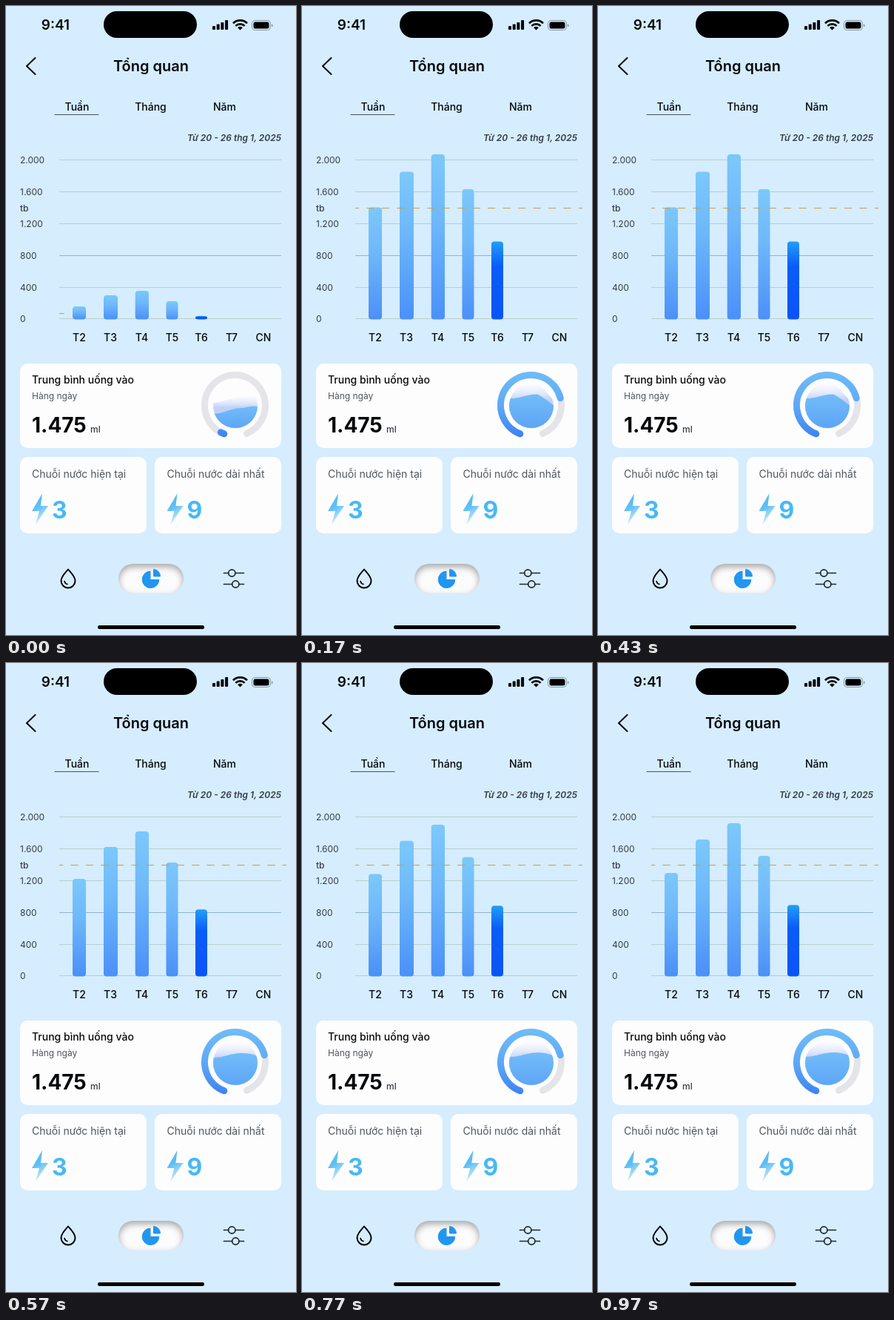
Recreate the animation shown at these times as an HTML page. Size 392 by 848 pixels, loop 1.01 s.

```html
<!DOCTYPE html>
<html lang="vi">
<head>
<meta charset="utf-8">
<title>Tổng quan</title>
<style>
  html, body { margin: 0; width: 100%; height: 100%; overflow: hidden; background: #d5edfe; }
  svg { display: block; width: 392px; height: 848px; }
  text { font-family: Inter, Roboto, sans-serif; font-size: 14px; fill: #06080a; }
  .mid { text-anchor: middle; }
  .med { font-weight: 500; }
  .small { font-size: 12px; fill: #343c44; }
  .soft { fill: #50565c; }
  .card { fill: #fdfdfe; }
  .streak { font-size: 32px; font-weight: 700; fill: #47b9f4; }
  .line { fill: none; stroke: #000; stroke-width: 2; stroke-linecap: round; stroke-linejoin: round; }
  .pill {
    position: absolute; left: 152px; top: 752px; width: 88px; height: 40px;
    border-radius: 20px; background: #fcfcfd;
    box-shadow: inset 0 4px 10px rgba(60, 60, 62, .45);
  }
  .pie { position: absolute; left: 0; top: 0; pointer-events: none; }
</style>
</head>
<body>
<svg viewBox="0 0 392 848">
  <defs>
    <linearGradient id="bar" x2="0" y2="1">
      <stop stop-color="#7cc8fa"/><stop offset=".4" stop-color="#6eb8fa"/><stop offset="1" stop-color="#4a90f8"/>
    </linearGradient>
    <linearGradient id="today" x2="0" y2="1">
      <stop stop-color="#249df6"/><stop offset=".32" stop-color="#0a5cf8"/><stop offset="1" stop-color="#0a54f6"/>
    </linearGradient>
    <linearGradient id="ring" gradientUnits="userSpaceOnUse" x1="0" y1="493" x2="0" y2="584">
      <stop stop-color="#6fbdf8"/><stop offset=".5" stop-color="#5ea8f6"/><stop offset="1" stop-color="#3b80f2"/>
    </linearGradient>
    <linearGradient id="mist" x2="0" y2="1">
      <stop stop-color="#e4e8fb" stop-opacity="0"/><stop offset=".36" stop-color="#c0d2f8"/>
    </linearGradient>
    <linearGradient id="water" x2="0" y2="1">
      <stop stop-color="#72bcf8"/><stop offset="1" stop-color="#5ca4f6"/>
    </linearGradient>
    <linearGradient id="zap" x2=".3" y2="1">
      <stop stop-color="#4fbcf5"/><stop offset=".5" stop-color="#5cbff5"/><stop offset="1" stop-color="#cfe9fb"/>
    </linearGradient>
    <clipPath id="bowl"><circle cx="310" cy="539" r="30"/></clipPath>
    <path id="bolt" d="M49 657L35 681H45L40 699L57 674H47Z" fill="url(#zap)"/>
  </defs>

  <!-- status bar -->
  <text class="mid" x="67" y="32" style="font-size:19px;font-weight:600">9:41</text>
  <rect x="132" y="7" width="126" height="36" rx="18"/>
  <rect x="279" y="27" width="4" height="5" rx="1"/>
  <rect x="284.7" y="24.5" width="4" height="7.5" rx="1"/>
  <rect x="290.4" y="22" width="4" height="10" rx="1"/>
  <rect x="296.1" y="19" width="4" height="13" rx="1"/>
  <g fill="none" stroke="#000" stroke-width="2.7">
    <path d="M307 23.2A13.6 13.6 0 0 1 326 23.2"/>
    <path d="M310.4 26.9A8.7 8.7 0 0 1 322.6 26.9"/>
  </g>
  <path d="M316.5 32.6L313.2 29.2A4.7 4.7 0 0 1 319.8 29.2Z"/>
  <rect x="332.5" y="19.5" width="25" height="13" rx="4" fill="none" stroke="#8b9aa6"/>
  <rect x="334.5" y="21.5" width="21" height="9" rx="2.5"/>
  <path d="M359 24V28.4Q360.6 27.6 360.6 26.2T359 24Z" fill="#8b9aa6"/>

  <!-- header -->
  <path class="line" d="M39.5 70L28 81L39.5 92"/>
  <text class="mid" x="196" y="88" style="font-size:20px;font-weight:600">Tổng quan</text>
  <text class="mid med" x="96" y="141">Tuần</text>
  <text class="mid med" x="195.5" y="141">Tháng</text>
  <text class="mid med" x="295.5" y="141">Năm</text>
  <path d="M65.5 146.5H125.5" stroke="#4a545c"/>
  <text class="small" x="372" y="182" text-anchor="end" style="font-weight:600;font-style:italic">Từ 20 - 26 thg 1, 2025</text>

  <!-- chart -->
  <g id="grid"></g>
  <text class="small med" x="19" y="276.5">tb</text>
  <g id="bars"></g>
  <path id="avg" stroke="#c3a24a"/>
  <g id="days"></g>

  <!-- daily average -->
  <rect class="card" x="19" y="482" width="353" height="114" rx="10"/>
  <text class="med" x="35" y="509">Trung bình uống vào</text>
  <text class="small soft" x="35" y="530">Hàng ngày</text>
  <text x="35" y="575" style="font-size:28px;font-weight:700">1.475</text>
  <text class="small med" x="114" y="575">ml</text>
  <g fill="none" stroke-width="9" stroke-linecap="round">
    <path id="track" stroke="#e4e4e9"/>
    <path id="fill" stroke="url(#ring)" pathLength="316"/>
  </g>
  <g clip-path="url(#bowl)">
    <path id="back" fill="url(#mist)"/>
    <path id="front" fill="url(#water)"/>
  </g>

  <!-- streaks -->
  <rect class="card" x="19" y="608" width="171" height="103" rx="10"/>
  <rect class="card" x="201" y="608" width="171" height="103" rx="10"/>
  <text class="soft" x="35" y="636">Chuỗi nước hiện tại</text>
  <text class="soft" x="217.5" y="636">Chuỗi nước dài nhất</text>
  <use href="#bolt"/>
  <use href="#bolt" x="182.5"/>
  <text class="streak" x="62" y="690.5">3</text>
  <text class="streak" x="244.5" y="690.5">9</text>

  <!-- navigation -->
  <path class="line" d="M84 759.5C80.5 764 74.5 769 74.5 775A9.5 9.5 0 0 0 93.5 775C93.5 769 87.5 764 84 759.5Z"/>
  <path class="line" d="M79 775.5A5 5 0 0 0 83 779.5" style="stroke-width:1.6"/>
  <g class="line" style="stroke:#20262c;stroke-width:1.7">
    <path d="M294.5 764.5H300.5M310 764.5H321.5M294.5 779.5H305.5M315 779.5H321.5"/>
    <circle cx="305.3" cy="764.5" r="4.6"/>
    <circle cx="310.3" cy="779.5" r="4.6"/>
  </g>
  <rect x="124" y="835" width="144" height="5" rx="2.5"/>
</svg>
<div class="pill"></div>
<svg class="pie" viewBox="0 0 392 848">
  <g fill="#2196f0" stroke="#2196f0" stroke-linejoin="round">
    <path d="M195 762A11.3 11.3 0 1 0 206.8 773.5H195Z"/>
    <path d="M199.5 759.5A9.3 9.3 0 0 1 208.5 769H199.5Z"/>
  </g>
</svg>

<script>
const $ = id => document.getElementById(id);
const LOOP = 1010, LAST = 29, BASE = 422.5;

function add(parent, tag, attrs, text = '') {
  const el = document.createElementNS('http://www.w3.org/2000/svg', tag);
  for (const key in attrs) el.setAttribute(key, attrs[key]);
  el.textContent = text;
  return $(parent).appendChild(el);
}

['2.000', '1.600', '1.200', '800', '400', '0'].forEach((label, i) => {
  const y = i < 5 ? 207.5 + i * 43 : 421.5;
  add('grid', 'path', { d: `M72 ${y}H372`, stroke: label === '800' ? '#93b3cc' : '#b9cfc6' });
  add('grid', 'text', { class: 'small', x: 19, y: y + 4.4 }, label);
});

[99, 141, 183.5, 224.5, 264, 305, 348].forEach((x, i) =>
  add('days', 'text', { class: 'mid med', x, y: 452 }, i < 6 ? 'T' + (i + 2) : 'CN'));

// x, width, height at rest, height when settled
const bars = [
  [90, 18, 17.5, 139.5], [132, 19, 32.5, 184.5], [174.7, 18.3, 38.5, 206.5],
  [216.5, 16, 24.5, 162.5], [256, 16, 4.5, 96.3]
].map(([x, width, from, to], i) => ({
  from, to,
  el: add('bars', 'rect', { x, width, rx: 4, fill: i < 4 ? 'url(#bar)' : 'url(#today)' })
}));

// circular arc in degrees, clockwise
function arc(a, b, r = 41) {
  const at = deg => {
    const k = deg * Math.PI / 180;
    return `${309.5 + r * Math.cos(k)} ${538.5 + r * Math.sin(k)}`;
  };
  return `M${at(a)}A${r} ${r} 0 1 1 ${at(b)}`;
}
$('track').setAttribute('d', arc(111, 427));
$('fill').setAttribute('d', arc(111, 427));

// step, progress, slope per step
const knots = [
  [0, 0, .165], [5, 1.095, .075], [10, 1.226, -.022], [13, 1.095, -.054],
  [17, .934, -.01], [23, .988, .004], [29, 1, 0]
];

function spring(n) {
  const i = Math.max(1, knots.findIndex(k => n <= k[0]));
  const [n0, v0, m0] = knots[i - 1], [n1, v1, m1] = knots[i];
  const d = n1 - n0, u = (n - n0) / d, w = 1 - u;
  return v0 * w * w * (1 + 2 * u) + v1 * u * u * (3 - 2 * u)
    + d * u * w * (m0 * w - m1 * u);
}

const mix = (a, b, p) => a + (b - a) * p;

// the right side drops when the spring overshoots
function wave(p, lift) {
  const over = Math.max(0, p - 1);
  const l = mix(549, 530, p) - lift;
  const m = mix(542, 525, Math.min(p, 1.1)) - lift;
  const r = mix(541, 530, p) + over * 110 - lift * Math.max(0, 1 - over * 5);
  return `M278 ${l}C290 ${l + 3} 302 ${m} 318 ${m}`
    + `C325 ${m + over * 35} 333 ${r - 4 - over * 30} 341 ${r}V572H278Z`;
}

// evenly fitted dashes with half a dash at both ends
function drawAverage(y, len) {
  const dash = len / Math.round(len / 20) / 2;
  $('avg').setAttribute('d', `M72 ${y}h${len}`);
  $('avg').setAttribute('stroke-dasharray', dash);
  $('avg').setAttribute('stroke-dashoffset', dash / 2);
}

function draw(n) {
  const p = spring(n);
  const held = n >= 5 ? 1 : Math.min(1, p);
  for (const { el, from, to } of bars) {
    const h = mix(from, to, p);
    el.setAttribute('y', BASE - h);
    el.setAttribute('height', h);
  }
  drawAverage(mix(414.5, 272.5, held), mix(27, 307, held));
  $('fill').setAttribute('stroke-dasharray', `${mix(7, 235, held)} 400`);
  $('back').setAttribute('d', wave(p, 15));
  $('front').setAttribute('d', wave(p, 0));
}

// thirty steps a second, on a 10 ms clock
const start = performance.now();
function tick() {
  const t = (performance.now() - start) % LOOP;
  draw(Math.min(LAST, Math.floor(Math.floor(t / 10) * .3 + .15)));
  requestAnimationFrame(tick);
}
tick();
</script>
</body>
</html>
```
